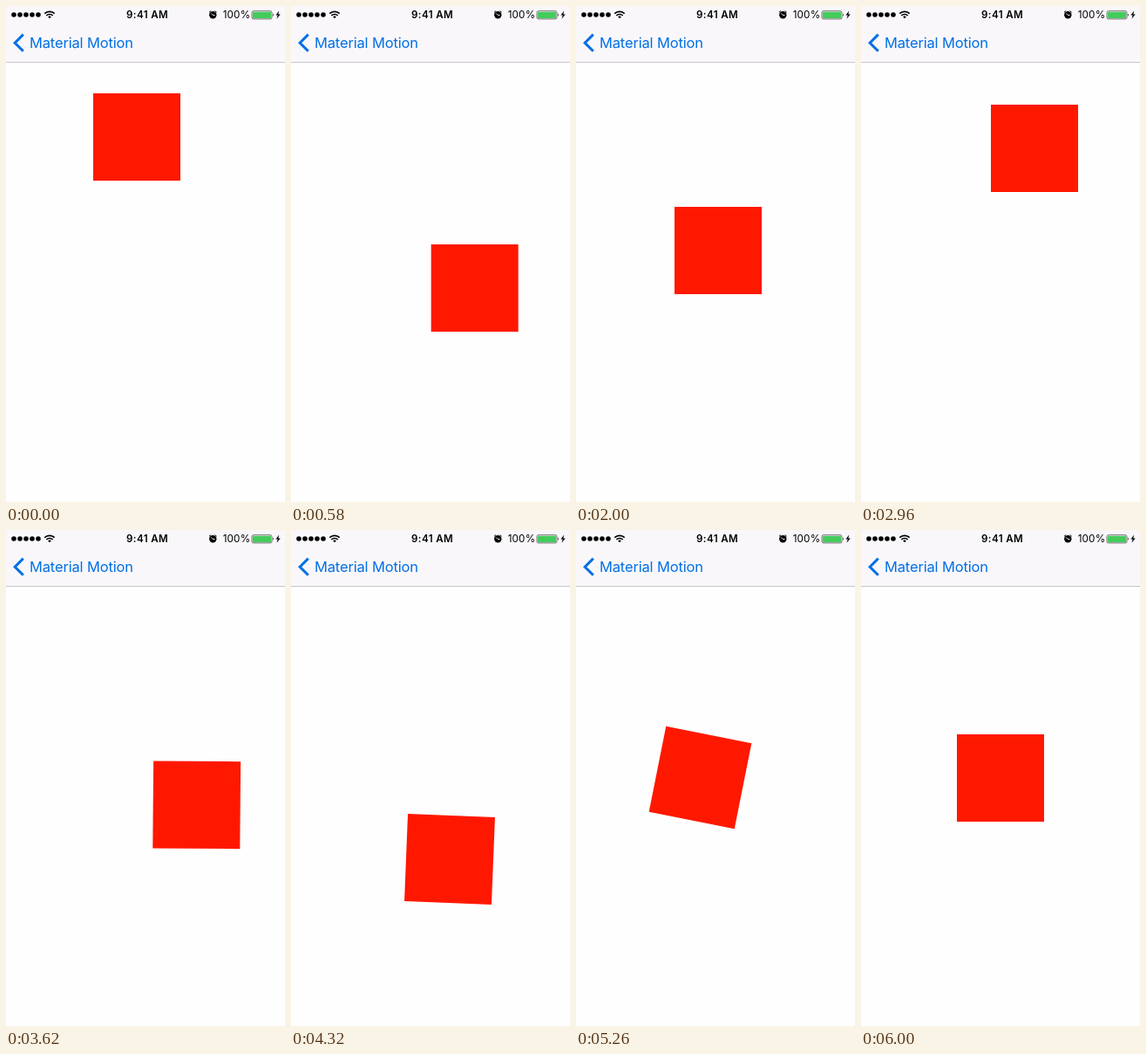
An HTML page for the animation above (6140 ms loop, 320x568 px).

```html
<!DOCTYPE html>
<html lang="en">
<head>
<meta charset="utf-8">
<title>Draggable square</title>
<style>
  html, body { margin: 0; width: 100%; height: 100%; overflow: hidden; background: #fefefe; }
  svg { display: block; width: 100%; height: 100%; }
  text { font-family: Inter, Roboto, sans-serif; }
</style>
</head>
<body>
<svg viewBox="0 0 320 568">
  <rect width="320" height="568" fill="#fefefe"/>
  <rect id="square" x="-50" y="-50" width="100" height="100" fill="#ff1800"/>

  <!-- Navigation bar -->
  <rect width="320" height="64" fill="#f9f7fa"/>
  <rect y="64" width="320" height="1" fill="#c8c7c9"/>
  <path d="M19.8 32.6 10.2 42.2 19.8 51.8" fill="none" stroke="#006fe6" stroke-width="3"/>
  <text x="27" y="48" font-size="16.5" letter-spacing="-.15" fill="#006fe6">Material Motion</text>

  <!-- Status bar -->
  <path d="M9 10h28.1" stroke="#000" stroke-width="5.6" stroke-linecap="round" stroke-dasharray="0 7"/>
  <path d="M44.3 8.7a8.2 8.2 0 0 1 11.4 0M46.3 11a5.3 5.3 0 0 1 7.4 0" fill="none" stroke="#000" stroke-width="1.7"/>
  <path d="M48.1 12.3a2.8 2.8 0 0 1 3.8 0L50 14.3Z"/>
  <text x="138" y="14.2" font-size="11.6" font-weight="600" letter-spacing=".4">9:41 AM</text>
  <circle cx="237.3" cy="10.2" r="4.2"/>
  <path d="M233 7.2 235 5.6M241.6 7.2 239.6 5.6" stroke="#000"/>
  <path d="M235.3 8.5l2 2h2.2" fill="none" stroke="#f9f7fa"/>
  <text x="248.7" y="14.2" font-size="11.7" letter-spacing=".15">100%</text>
  <rect x="282" y="5.7" width="23" height="9.2" rx="2" fill="none" stroke="#333" stroke-width=".7"/>
  <rect x="283" y="6.7" width="21" height="7.2" rx="1" fill="#43cc5b"/>
  <path d="M306 8.4q1.6 1.8 0 3.6Z"/>
  <path d="M313.2 5.6 309.4 10.6h2.3l-1.2 4.2 4.2-5.4h-2.4Z"/>
</svg>
<script>
const LOOP = 6140, STEP = 20;
const square = document.getElementById('square');

// Turning points of the drag: time, centre x, centre y, rotation
const turns = [
  [200, 150, 150, 0], [900, 257, 455, 0], [1140, 158.5, 296, 0],
  [1500, 263, 433, 0], [2000, 163, 280, 0], [2560, 270, 150, 0],
  [2960, 199, 163, 0], [3140, 50, 469, 0], [3500, 217, 300, 0],
  [4100, 235, 455, 5], [4320, 182, 377, 2.3], [4840, 221, 464, 8],
  [5260, 142.5, 283.5, 11.3], [5540, 243, 471, 10], [5760, 160, 284, 0]
];

const clamp = u => Math.min(1, Math.max(0, u));
const ease = u => (1 - Math.cos(Math.PI * u)) / 2;

function pose(t) {
  const next = turns.findIndex(turn => turn[0] > t);
  const i = next < 0 ? turns.length - 1 : Math.max(1, next);
  const from = turns[i - 1], to = turns[i];
  const u = ease(clamp((t - from[0]) / (to[0] - from[0])));
  return from.map((a, c) => a + (to[c] - a) * u);
}

const start = performance.now();
function draw() {
  const elapsed = (performance.now() - start) % LOOP;
  const [, x, y, angle] = pose(Math.floor(elapsed / STEP) * STEP);
  square.setAttribute('transform', `translate(${x} ${y}) rotate(${angle})`);
  requestAnimationFrame(draw);
}
draw();
</script>
</body>
</html>
```
